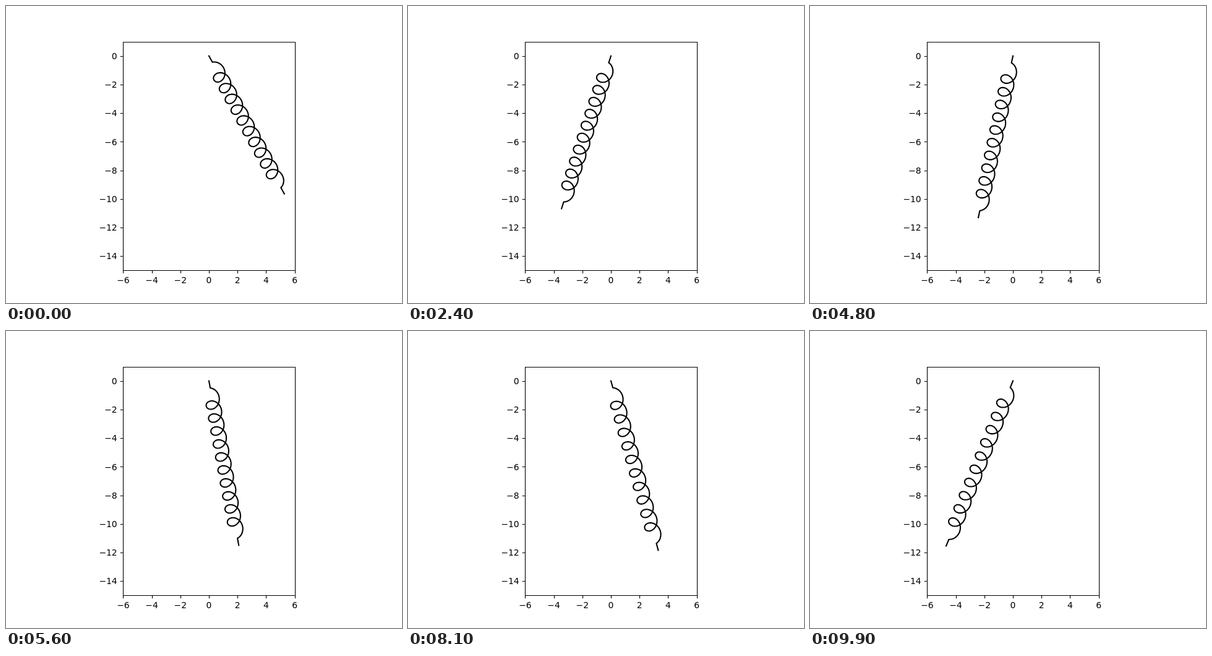
Recreate the animation shown at these times as an HTML page. Size 640x480 px, loop 10000 ms.

```html
<!DOCTYPE html>
<html lang="en">
<head>
<meta charset="utf-8">
<title>Spring pendulum</title>
<style>
  html, body { margin: 0; width: 100%; height: 100%; overflow: hidden; background: #fff; }
  svg { display: block; }
  text { font: 13.89px "DejaVu Sans", sans-serif; fill: #000; }
  .frame { fill: none; stroke: #000; stroke-width: 1.11; }
  .spring { fill: none; stroke: #000; stroke-width: 2.083; stroke-linejoin: round; stroke-linecap: square; }
</style>
</head>
<body>
<svg width="640" height="480" viewBox="0 0 640 480">
  <g id="axes"></g>
  <path id="spring" class="spring"/>
</svg>
<script>
const SCALE = 23.1, X0 = 328, Y0 = 80.7;
const LOOP = 10000, STEP = 100;
const TURNS = 10.5, RADIUS = 0.5, LEAD = 0.5;

// time in s, angle in rad, length in axis units
const KEYS = [
  [0, 0.5, 11], [1.1, 0.314, 11.2], [1.6, 0.0755, 11.07], [2.2, -0.234, 11.22],
  [2.4, -0.313, 11.23], [3.5, -0.487, 11.43], [4.4, -0.369, 11.6], [4.8, -0.211, 11.57],
  [5.5, 0.139, 11.68], [6.5, 0.43, 11.73], [7.1, 0.47, 12], [7.7, 0.4065, 12.24],
  [8.1, 0.2725, 12.3], [8.8, -0.042, 12.43], [9.9, -0.3845, 12.46]
];

const px = x => X0 + x * SCALE;
const py = y => Y0 - y * SCALE;
const snap = v => Math.floor(v + 0.5) + 0.5;
const label = n => String(n).replace("-", "\u2212");

function add(parent, name, attrs, content = "") {
  const el = document.createElementNS("http://www.w3.org/2000/svg", name);
  for (const key in attrs) el.setAttribute(key, attrs[key]);
  el.textContent = content;
  parent.append(el);
}

function drawAxes() {
  const axes = document.getElementById("axes");
  const left = snap(px(-6)), right = snap(px(6));
  const top = snap(py(1)), bottom = snap(py(-15));
  let d = `M${left} ${top}H${right}V${bottom}H${left}Z`;
  for (let n = -6; n <= 6; n += 2) {
    d += `M${snap(px(n))} ${bottom}v4.86`;
    add(axes, "text", { x: px(n), y: 448, "text-anchor": "middle" }, label(n));
  }
  for (let n = 0; n >= -14; n -= 2) {
    d += `M${left} ${snap(py(n))}h-4.86`;
    add(axes, "text", { x: 179.7, y: Math.round(py(n) + 5.2), "text-anchor": "end" }, label(n));
  }
  add(axes, "path", { class: "frame", d });
}

const secant = (i, c) => (KEYS[i + 1][c] - KEYS[i][c]) / (KEYS[i + 1][0] - KEYS[i][0]);

function slope(i, c) {
  const last = KEYS.length - 1;
  if (i === 0) return 0;
  if (i === last) return 2 * secant(i - 1, c) - slope(i - 1, c);
  const before = KEYS[i][0] - KEYS[i - 1][0], after = KEYS[i + 1][0] - KEYS[i][0];
  return (before * secant(i, c) + after * secant(i - 1, c)) / (before + after);
}

// cubic Hermite curve through one column of KEYS
function valueAt(t, c) {
  let i = 0;
  while (i < KEYS.length - 2 && t > KEYS[i + 1][0]) i++;
  const h = KEYS[i + 1][0] - KEYS[i][0], u = (t - KEYS[i][0]) / h;
  const a = KEYS[i][c], b = KEYS[i + 1][c];
  const ease = u * u * (3 - 2 * u);
  return a + (b - a) * ease
    + h * u * (1 - u) * ((1 - u) * slope(i, c) - u * slope(i + 1, c));
}

function springPath(angle, length) {
  const sin = Math.sin(angle), cos = Math.cos(angle);
  const point = (along, side) =>
    px(along * sin + side * cos).toFixed(2) + " " + py(-along * cos + side * sin).toFixed(2);
  const end = TURNS * 2 * Math.PI, count = TURNS * 40;
  const rise = (length - 2 * LEAD - 2 * RADIUS) / end;
  const points = [point(0, 0)];
  for (let i = 0; i <= count; i++) {
    const phi = end * i / count;
    points.push(point(LEAD + rise * phi + RADIUS * (1 - Math.cos(phi)), RADIUS * Math.sin(phi)));
  }
  points.push(point(length, 0));
  return "M" + points.join("L");
}

const spring = document.getElementById("spring");
const start = performance.now();

function render(now) {
  const ms = Math.max(0, now - start) % LOOP;
  const t = Math.floor(ms / STEP) * STEP / 1000;
  spring.setAttribute("d", springPath(valueAt(t, 1), valueAt(t, 2)));
  requestAnimationFrame(render);
}

drawAxes();
render(start);
</script>
</body>
</html>
```
